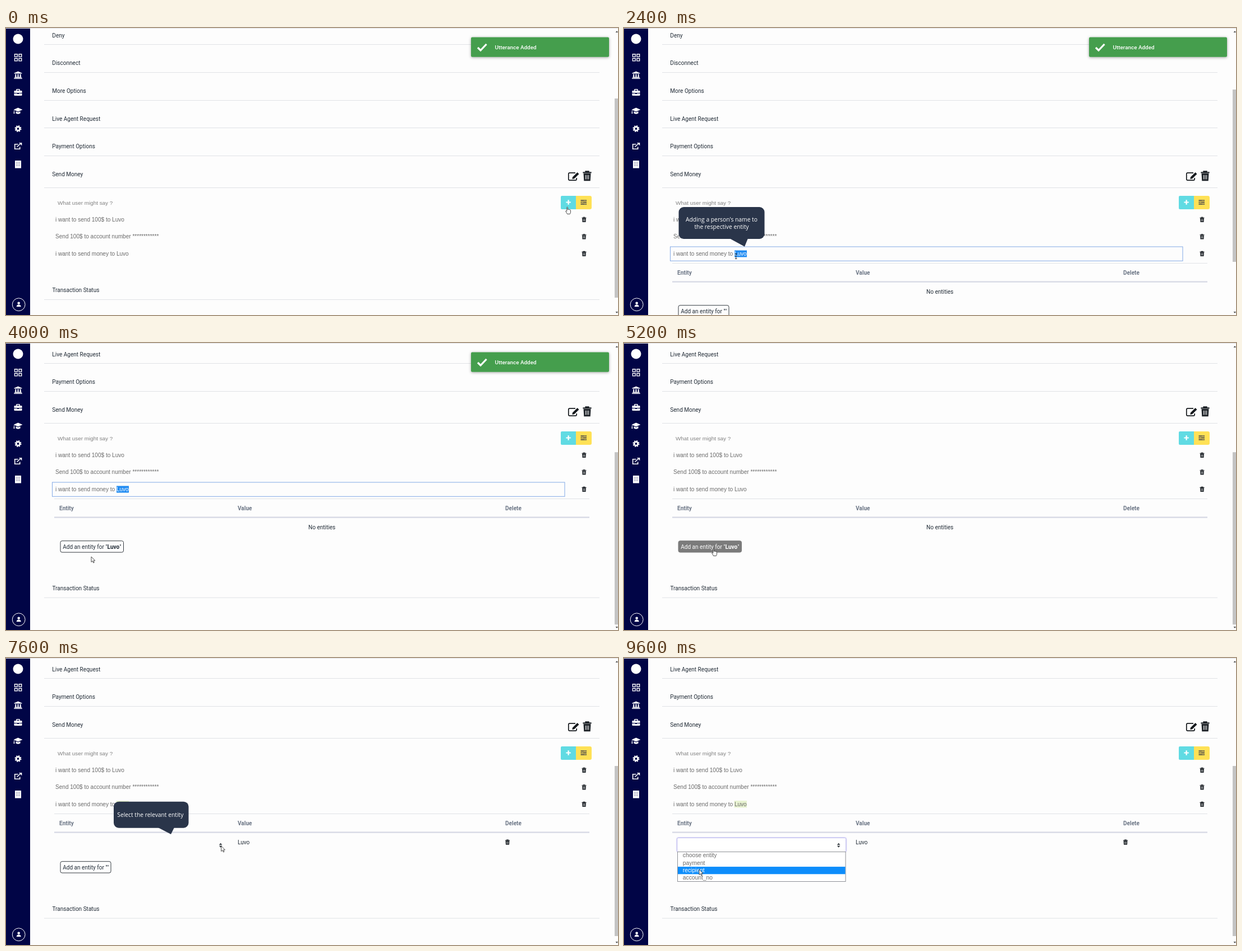
These frames come from a looping animation (1091x513 px, 10000 ms). An HTML page:

```html
<!DOCTYPE html>
<html lang="en">
<head>
<meta charset="utf-8">
<title>Adding an entity</title>
<style>
html, body { margin: 0; height: 100%; overflow: hidden; background: #fdfdfd; }
svg { display: block; width: 100vw; height: 100vh; }
text { font: 10.05px Roboto, sans-serif; fill: #212b36; white-space: pre; }
.field { font-family: "Liberation Sans", Arial, sans-serif; fill: #6a6a6a; }
.hint { font-size: 9.9px; fill: #818181; }
.head { font-weight: 700; fill: #6b7585; }
.tip text { font: 10.3px "Open Sans", sans-serif; fill: #fff; text-anchor: middle; }
.tip path, .tip rect { fill: #2a354a; }
.option { font-size: 10.3px; }
.line { stroke: #e0e2e6; fill: none; }
</style>
</head>
<body>
<svg viewBox="0 0 1091 513" preserveAspectRatio="none">
  <defs>
    <g id="trash">
      <path d="M-3.4-2.4H3.4L3 4.4H-3Z" fill="#1c2126"/>
      <path d="M-4-3.2H4M-1.4-3.6V-4.3H1.4V-3.6" stroke="#1c2126" stroke-width="1.1" fill="none"/>
      <path d="M-1.4-1V3M0-1V3M1.4-1V3" stroke="#fff" stroke-width=".55"/>
    </g>
    <clipPath id="marked"><rect id="markedBox" y="396" width="80" height="14"/></clipPath>
    <filter id="soft" x="-10%" y="-50%" width="120%" height="200%"><feDropShadow dx="0" dy="1" stdDeviation="2.5" flood-opacity=".35"/></filter>
    <filter id="glow" x="-5%" y="-40%" width="110%" height="180%"><feDropShadow dx="0" dy="0" stdDeviation="1.3" flood-color="#a9a4ee"/></filter>
  </defs>
  <rect width="1091" height="513" fill="#fdfdfd"/>

  <g id="page">
    <g id="rows"></g>
    <path class="line" d="M68 285.5H1058"/>
    <g stroke="#15191d" fill="none" stroke-width="1.7">
      <path d="M1015 258.8H1005Q1002.8 258.8 1002.8 261V270Q1002.8 272.2 1005 272.2H1015Q1017.2 272.2 1017.2 270V268"/>
      <path d="M1010 266.5L1018.5 258L1021.5 261L1013 269.2L1009.3 270Z" fill="#15191d" stroke="none"/>
    </g>
    <use href="#trash" transform="translate(1036 264.6) scale(1.9 1.95)"/>

    <text class="field hint" x="92" y="315.6">What user might say ?</text>
    <path d="M991 300H1016V324H991Q989 324 989 322V302Q989 300 991 300" fill="#60dbe3"/>
    <path d="M1016 300H1041Q1044 300 1044 303V321Q1044 324 1041 324H1016Z" fill="#ffe156"/>
    <path d="M1002.6 307.3V315.7M998.4 311.5H1006.8" stroke="#fff" stroke-width="2.2"/>
    <path d="M1024.5 308.2H1035M1024.5 311.5H1035M1024.5 314.8H1035" stroke="#58554a" stroke-width="2.1"/>
    <path d="M1030 308.2H1034M1026 311.5H1029M1031 314.8H1034" stroke="#b4a45a" stroke-width=".8"/>

    <text class="field" x="88" y="346">i want to send 100$ to Luvo</text>
    <text class="field" x="88" y="376.4">Send 100$ to account number ************</text>
    <rect id="tag" x="196.5" y="397" width="22.5" height="12.5" fill="#e8f3d2"/>
    <text class="field" x="88" y="407">i want to send money to Luvo</text>
    <rect id="focus" x="82.5" y="391" width="913.5" height="25.3" fill="none" stroke="#82a9e6"/>
    <g id="selection" clip-path="url(#marked)">
      <rect x="197" y="397.5" width="22" height="12" fill="#1f8bf2"/>
      <text class="field" x="88" y="407" style="fill:#fff">i want to send money to Luvo</text>
    </g>
    <use href="#trash" x="1030.5" y="342.5"/>
    <use href="#trash" x="1030.5" y="373"/>
    <use href="#trash" x="1030.5" y="403.6"/>

    <g id="table">
      <path class="line" d="M86 420.5H1040"/>
      <text class="head" x="95" y="440.6">Entity</text>
      <text class="head" x="413" y="440.6">Value</text>
      <text class="head" x="890" y="440.6">Delete</text>
      <path d="M86 453.6H1040" stroke="#d6d8e4" stroke-width="2.2"/>
      <text id="empty" x="539" y="475">No entities</text>
      <g id="button">
        <rect id="buttonBox" x="97" y="495.7" height="20.4" rx="3"/>
        <text id="label" x="101.2" y="509.7">Add an entity for "<tspan id="quoted" font-weight="700">Luvo</tspan>"</text>
      </g>
      <g id="entity">
        <rect id="select" x="94.7" y="463.5" width="301" height="25" rx="2" fill="#fff" stroke="#bdb9ee" filter="url(#glow)"/>
        <path d="M379.8 476L382.6 472.8L385.4 476ZM379.8 477.6L382.6 480.8L385.4 477.6Z" fill="#343a40"/>
        <text x="413" y="475">Luvo</text>
        <use href="#trash" x="894" y="471.3"/>
      </g>
    </g>
    <g id="footer">
      <text x="82.4" y="472">Transaction Status</text>
      <path class="line" d="M68 485.5H1058"/>
    </g>
  </g>

  <g id="menu">
    <rect x="95.5" y="346.5" width="299.5" height="53" fill="#fff" stroke="#8e9096"/>
    <rect id="bar" x="96" width="298.5" height="13.2" fill="#0d8dfb"/>
  </g>

  <path d="M0 .5H1091" stroke="#e3e3e6"/>
  <rect id="thumb" x="1085" width="6" fill="#c4c4c4"/>
  <path d="M1086.5 8L1089 5L1091 8ZM1086.5 507L1089 510L1091 507Z" fill="#555"/>

  <rect y="1" width="43" height="512" fill="#010546"/>
  <circle cx="21.5" cy="19.5" r="9" fill="#fff"/>
  <g fill="#fff">
    <path d="M15.5 46.7h4.7v4.7h-4.7zM23 46.7h4.7v4.7H23zM15.5 54.2h4.7v4.7h-4.7zM23 54.2h4.7v4.7H23z" fill="none" stroke="#fff" stroke-width="1.4"/>
    <path d="M14.5 81.5V80.5L21.5 77.5L28.5 80.5V81.5ZM16.3 82.5h2v5h-2zM20.5 82.5h2v5h-2zM24.7 82.5h2v5h-2zM15.3 87.5H27.7V89H15.3ZM14.3 89.5H28.7V91H14.3Z"/>
    <path d="M15.5 112H18V110.5Q18 109 19.5 109H23.5Q25 109 25 110.5V112H27.5Q28.5 112 28.5 113V116H14.5V113Q14.5 112 15.5 112M19.5 112H23.5V110.5H19.5ZM14.5 117H20V118H23V117H28.5V120Q28.5 121 27.5 121H15.5Q14.5 121 14.5 120Z"/>
    <path d="M13.5 146L21.5 142.5L29.5 146L21.5 149.5ZM17.5 149L21.5 150.7L25.5 149V152.5Q21.5 154.8 17.5 152.5ZM14.7 147L15.5 153H13.5L14.2 147Z"/>
    <circle cx="21.5" cy="180" r="3.2" fill="none" stroke="#fff" stroke-width="2.6"/>
    <circle cx="21.5" cy="180" r="5" fill="none" stroke="#fff" stroke-width="2" stroke-dasharray="2.2 1.727"/>
    <path d="M21.5 207.7H15.7V216.3H24.7V212.5M19.5 212.5L26 206.5" fill="none" stroke="#fff" stroke-width="1.6"/>
    <path d="M23 205H28.3V210.3Z"/>
    <path d="M16 237H27V250.5H16Z"/>
    <path d="M18 240H25M18 243H25M18 246H25" stroke="#010546" stroke-width=".8" stroke-dasharray="1.5 1.2"/>
    <circle cx="22.7" cy="494.3" r="11.4" fill="none" stroke="#fff"/>
    <circle cx="22.7" cy="491.8" r="2.3"/>
    <path d="M18.7 498.3Q18.7 494.4 22.7 494.4T26.7 498.3Z"/>
  </g>

  <g id="toast">
    <rect x="829" y="16.5" width="246" height="35.3" rx="2" fill="#459e4d" filter="url(#soft)"/>
    <path d="M841 35L846 40L856.5 28.8" fill="none" stroke="#fff" stroke-width="3.2"/>
    <text x="871.5" y="37.5" style="fill:#fff;font-size:9.9px;font-weight:500">Utterance Added</text>
  </g>

  <g id="nameTip" class="tip">
    <rect x="97.5" y="320" width="153" height="57" rx="9"/>
    <path d="M188 376H221L215 390.8Z"/>
    <text x="174" y="345.5">Adding a person's name to</text>
    <text x="174" y="359.3">the respective entity</text>
  </g>
  <g id="entityTip" class="tip">
    <rect x="192" y="256.7" width="133.5" height="47" rx="9"/>
    <path d="M271 303H300L294 315Z"/>
    <text x="257.3" y="284">Select the relevant entity</text>
  </g>

  <g id="cursor">
    <path id="arrow" d="M0 0V9.6L2.2 7.6L3.8 11L5.3 10.3L3.8 7H6.8Z" fill="#fff" stroke="#222" stroke-width=".8"/>
    <path id="beam" d="M-1.8-4.5H1.8M0-4.5V4.5M-1.8 4.5H1.8" stroke="#222" fill="none" stroke-width=".9"/>
    <path id="hand" d="M-.7 1Q0-.4 .8 1V5Q2 4 2.8 5.2Q4 4.4 4.6 5.6Q6 5.2 6 6.8V9.5Q6 11 4.8 13H0Q-1 10.5-3 8Q-2.5 6.6-.7 8Z" fill="#fff" stroke="#222" stroke-width=".8"/>
  </g>
</svg>
<script>
const LOOP = 10000, STEP = 200;
const el = id => document.getElementById(id);
const set = (id, attrs) => { for (const k in attrs) el(id).setAttribute(k, attrs[k]); };
const show = (id, on) => set(id, { opacity: +on });
const move = (id, x, y) => set(id, { transform: `translate(${x} ${y})` });
const clamp = v => Math.min(1, Math.max(0, v));
const smooth = u => u * u * (3 - 2 * u);

function addText(parent, x, y, str, cls) {
  const node = document.createElementNS("http://www.w3.org/2000/svg", "text");
  parent.append(node);
  node.textContent = str;
  node.setAttribute("x", x);
  node.setAttribute("y", y);
  node.setAttribute("class", cls);
  return node;
}

["Deny", "Disconnect", "More Options", "Live Agent Request", "Payment Options", "Send Money"].forEach((name, i) => {
  addText(el("rows"), 82.3, 16.7 + 49.65 * i, name, "");
  if (i < 5) el("rows").insertAdjacentHTML("beforeend", `<path class="line" d="M68 ${Math.round(29 + 49.75 * i) + .5}H1058"/>`);
});
const options = ["choose entity", "payment", "recipient", "account_no"]
  .map((name, i) => addText(el("menu"), 104.8, 356.3 + 13.2 * i, name, "field option"));

// [time, x, y] of the pointer and [time, offset] of the scroll
const pointerPath = [
  [0, 1000.5, 319.5], [1200, 219, 404], [2000, 219, 404], [2400, 199.7, 408], [2600, 199.7, 408],
  [3200, 201, 438], [3400, 201, 438], [4000, 152, 382], [4400, 159.5, 367.5], [6000, 159.5, 367.5],
  [7200, 383.7, 336], [8400, 383.7, 336], [9600, 134, 378]
];
const scrollPath = [[2800, 0], [3200, 92], [3400, 92], [3800, 142]];

function along(path, t) {
  const next = path.findIndex(p => p[0] > t);
  if (next < 0) return path.at(-1).slice(1);
  if (next === 0) return path[0].slice(1);
  const a = path[next - 1], b = path[next];
  const u = smooth((t - a[0]) / (b[0] - a[0]));
  return a.slice(1).map((v, i) => v + (b[i + 1] - v) * u);
}

// opacity that rises after `from` and falls after `to`
const fade = (t, from, to, span = 400) => clamp((t - from) / span) * clamp(1 - (t - to) / span);

function draw(t) {
  const [x, y] = along(pointerPath, t);
  const [scroll] = along(scrollPath, t);
  const open = t >= 1400, added = t >= 5400, menu = t >= 8400;
  const named = t >= 2800 && !added;
  const hover = t >= 4400 && t < 6400;

  move("page", 0, -scroll);
  move("footer", 0, added ? 121.7 : open ? 111.7 : 0);
  move("button", 0, added ? 10 : 0);
  set("thumb", added ? { y: 193, height: 304 } : open ? { y: 110 + .6 * scroll, height: 308 } : { y: 126, height: 356 });

  show("table", open);
  show("focus", open && t < 5200);
  show("selection", t >= 2200 && t < 5200);
  set("markedBox", { x: t < 2400 ? 208 : 196 });
  show("tag", added);
  show("empty", !added);
  show("entity", added);
  show("select", menu);
  show("menu", menu);
  el("quoted").textContent = named ? "Luvo" : "";
  set("buttonBox", { width: named ? 112.5 : 90, fill: hover ? "#7b7b7b" : "#fdfdfd", stroke: hover ? "#7b7b7b" : "#343a40" });
  el("label").style.fill = hover ? "#fff" : "";

  const picked = Math.max(0, Math.floor((y - 346.5) / 13.2));
  set("bar", { y: 346.7 + 13.2 * picked });
  options.forEach((node, i) => node.style.fill = i === picked ? "#fff" : "");

  show("toast", 0);
  set("toast", { opacity: clamp((4600 - t) / 600) });
  set("nameTip", { opacity: fade(t, 1400, 3400) });
  set("entityTip", { opacity: fade(t, 6400, 7600) });

  const hand = t < 200 || hover, beam = !hand && t >= 1000 && t < 3000;
  move("cursor", x, y);
  show("hand", hand);
  show("beam", beam);
  show("arrow", !hand && !beam);
}

function tick() {
  draw(Math.floor(performance.now() % LOOP / STEP) * STEP);
  requestAnimationFrame(tick);
}
tick();
</script>
</body>
</html>
```
